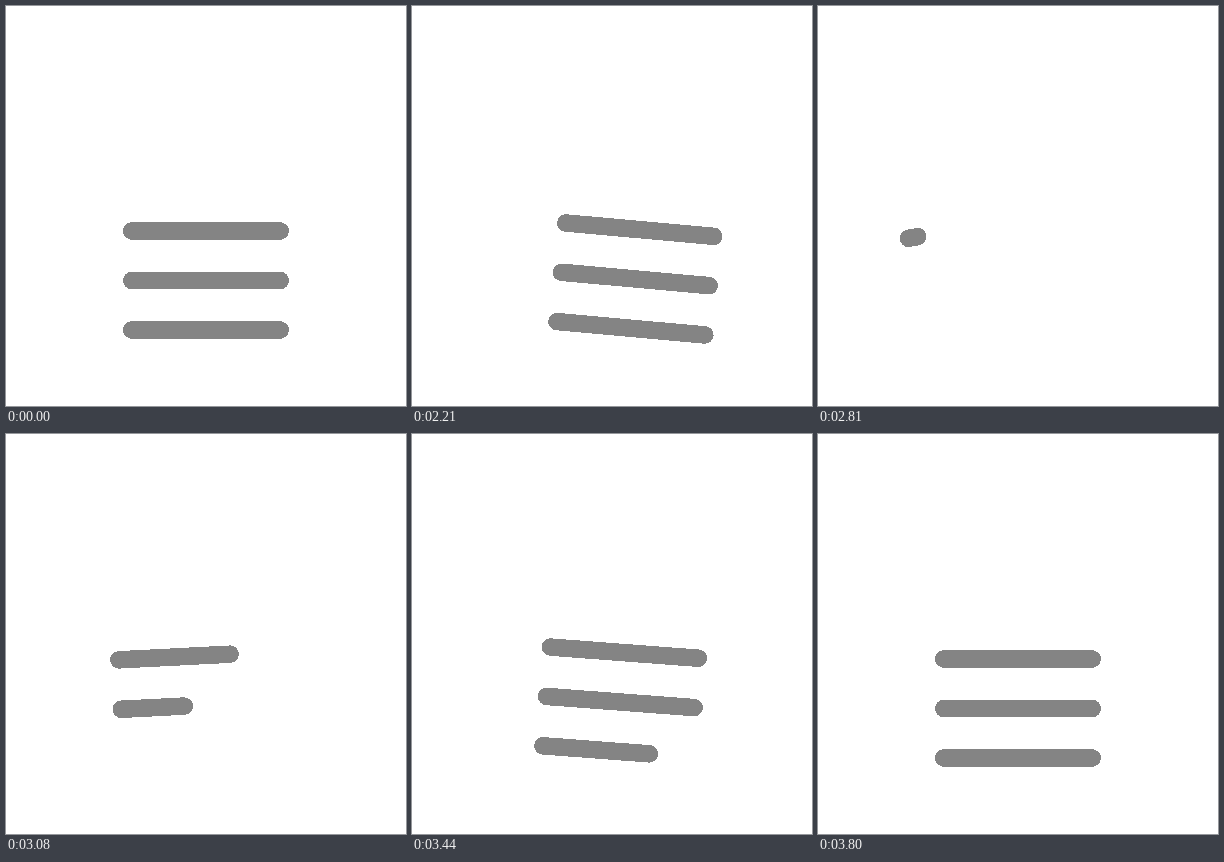
Recreate the animation shown at these times as an HTML page. Size 400 px wide and 400 px high, loop 3.83 s.

```html
<!DOCTYPE html>
<html lang="en">
<head>
<meta charset="utf-8">
<title>Menu lines</title>
<style>
  html, body { margin: 0; width: 100%; height: 100%; overflow: hidden; background: #fff; }
  svg { display: block; width: 100%; height: 100%; shape-rendering: crispEdges; }
  path { fill: none; stroke: #848484; stroke-width: 17.5; stroke-linecap: round; }
</style>
</head>
<body>
<svg viewBox="0 0 400 400"><g id="lines"><path/><path/><path/></g></svg>
<script>
const LOOP = 3830, SWING_START = 2030, STEP = 30;
const HALF = 74.25, GAP = 49.5, CENTER_X = 200, CENTER_Y = 274.5;
const ERASE_START = 2520, ERASE_END = 2660;
const DRAW_START = 2788, DRAW_TIME = 540, STAGGER = 47;

// The group swings from pose to pose; lift is the rise in pixels per degree of tilt.
const poses = [
  { at: 2000, x: 0, tilt: 0, lift: 0.3 },
  { at: 2400, x: 43.4, tilt: 9.6, lift: 0.3 },
  { at: 2790, x: -28.3, tilt: -9.6, lift: 0.6 },
  { at: 3390, x: 9, tilt: 4.5, lift: 1.5 },
  { at: 3800, x: 0, tilt: 0, lift: 1.5 },
];

const group = document.getElementById('lines');
const paths = [...group.children];

const clamp = u => Math.min(1, Math.max(0, u));
const progress = (t, from, to) => clamp((t - from) / (to - from));
const smooth = u => u * u * (3 - 2 * u);

function poseAt(t) {
  const next = Math.max(1, poses.findIndex(pose => pose.at >= t));
  const a = poses[next - 1], b = poses[next];
  const u = smooth(progress(t, a.at, b.at));
  const mix = key => a[key] + (b[key] - a[key]) * u;
  const tilt = mix('tilt');
  return { x: mix('x'), y: -mix('lift') * Math.abs(tilt), tilt };
}

function visiblePart(t, i) {
  if (t < ERASE_END) return 1 - smooth(progress(t, ERASE_START, ERASE_END));
  const start = DRAW_START + STAGGER * i * (i + 2);
  return Math.sin(progress(t, start, start + DRAW_TIME) * Math.PI / 2);
}

function render(time) {
  const t = time < SWING_START ? 0
    : SWING_START + Math.floor((time - SWING_START) / STEP) * STEP;
  const { x, y, tilt } = poseAt(t);
  group.setAttribute('transform',
    `translate(${CENTER_X + x} ${CENTER_Y + y}) rotate(${tilt})`);
  paths.forEach((path, i) => {
    const part = visiblePart(t, i);
    path.setAttribute('d', part > 0 ? `M${-HALF} ${(i - 1) * GAP}h${2 * HALF * part}` : '');
  });
}

const start = performance.now();
function tick() {
  render((performance.now() - start) % LOOP);
  requestAnimationFrame(tick);
}
tick();
</script>
</body>
</html>
```
